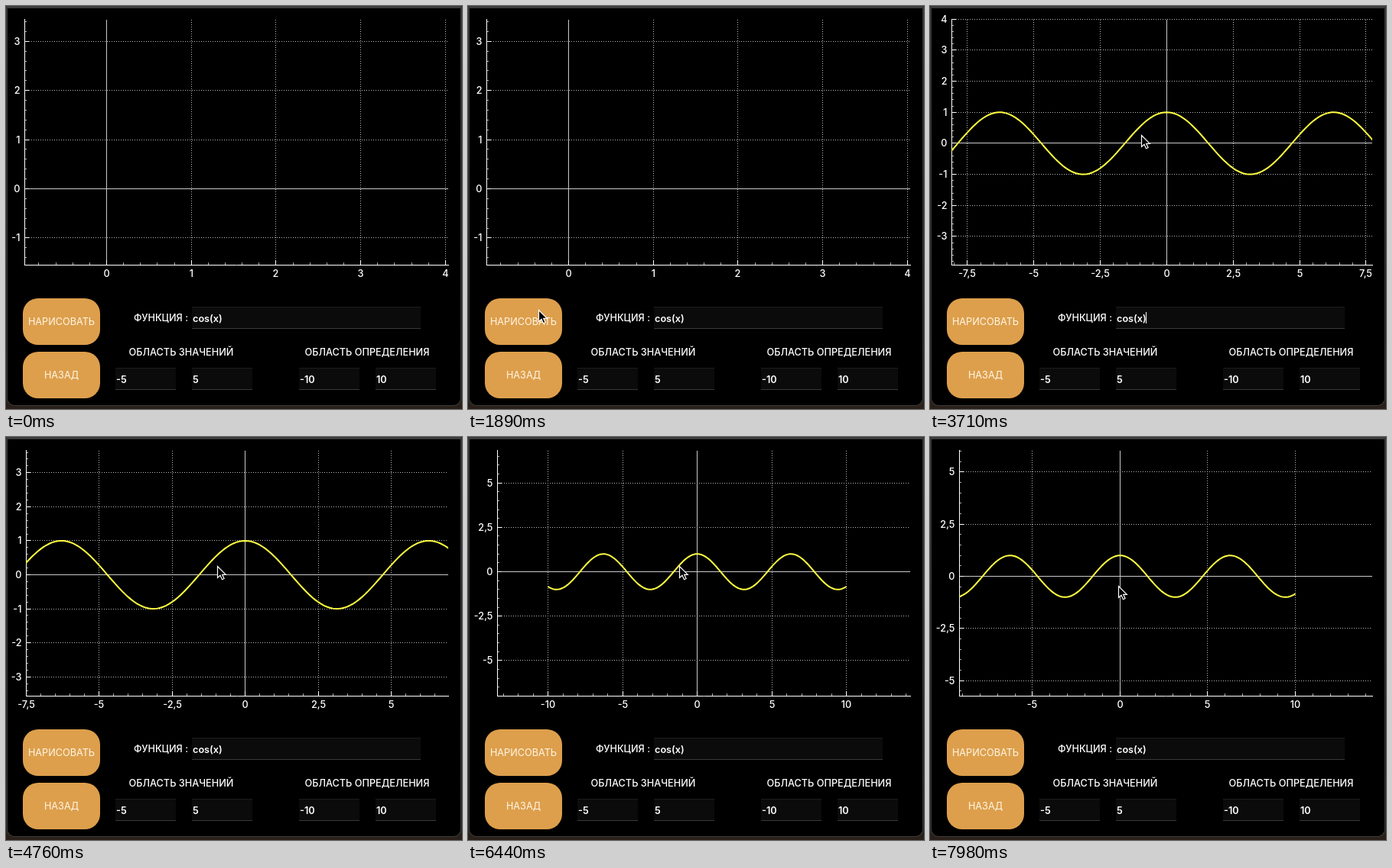
These frames come from a looping animation (596x528 px, 8 s). An HTML page with a canvas:

```html
<!DOCTYPE html>
<html lang="ru">
<head>
<meta charset="utf-8">
<style>
  html, body { margin: 0; width: 596px; height: 528px; overflow: hidden; background: #000; }
  canvas { display: block; }
</style>
</head>
<body>
<canvas id="stage" width="596" height="528"></canvas>
<script>
const ctx = document.getElementById('stage').getContext('2d');
const LOOP = 8000, STEP = 70, DRAWN = 2030;
const TOP = 17, BOTTOM = 339, RIGHT = 578;
const FONT = '12.7px Inter, "Noto Sans", sans-serif';

// time, pixels per unit of x
const zoom = [
  [3430, 27.5], [3990, 42], [4690, 42], [4760, 38.2], [5110, 32],
  [5250, 32], [5390, 28.5], [5460, 28.5], [5600, 25.1], [5670, 25.1],
  [5810, 22.1], [6020, 22.1], [6230, 18.6], [6300, 18.6], [6440, 19.5],
  [6580, 22.9]
];

// time, shift of the plot by dragging
const pan = [
  [3430, -1.6, .3], [3990, 0, 0], [6790, 0, 0], [7350, -46.4, 2.3],
  [7490, -49.4, 4.3], [7560, -49.4, 4.3], [7700, -51.4, 5],
  [7840, -51.4, 5], [7980, -53.4, 5.3]
];

// time, x, y of the pointer tip
const pointer = [
  [560, 487, 488], [910, 300, 430], [1190, 120, 385], [1330, 92, 398],
  [2660, 92, 398], [2940, 168, 300], [3430, 276, 169], [6650, 276, 169],
  [6790, 300, 188], [7350, 252, 192], [7560, 250, 193], [7840, 248, 195],
  [7980, 246, 195]
];

const caretTimes = [[2520, 3010], [3500, 3990], [5530, 5950]];

// smallest scale, label step, tick step
const xSteps = [[90, 1, .2], [34, 2.5, .5], [0, 5, 1]];
const ySteps = [[40, 1, .2], [30, 2, .5], [0, 2.5, .5]];

function at(keys, t) {
  const next = keys.findIndex(k => k[0] > t);
  if (next < 0) return keys[keys.length - 1].slice(1);
  if (next === 0) return keys[0].slice(1);
  const a = keys[next - 1], b = keys[next];
  const p = (t - a[0]) / (b[0] - a[0]);
  return a.slice(1).map((v, i) => v + (b[i + 1] - v) * p);
}

function viewAt(t) {
  if (t < DRAWN) return { x0: 131, sx: 110.7, y0: 239, sy: 64.4, left: 24 };
  const [sx] = at(zoom, t), [dx, dy] = at(pan, t);
  const k = (sx - 19.5) / 18.7;
  const left = sx > 36 ? 26 : sx > 26 ? 28 : 38;
  return { x0: 299 + 13 * k + dx, sx, y0: 176 + 4 * k + dy, sy: sx * 644 / (RIGHT - left), left };
}

const crisp = v => Math.round(v) + .5;

function line(x1, y1, x2, y2, color, dash = []) {
  ctx.strokeStyle = color;
  ctx.lineWidth = 1;
  ctx.setLineDash(dash);
  ctx.beginPath();
  ctx.moveTo(x1, y1);
  ctx.lineTo(x2, y2);
  ctx.stroke();
  ctx.setLineDash([]);
}

function text(s, x, y, align = 'left', weight = 500, color = '#fff') {
  ctx.font = weight + ' ' + FONT;
  ctx.textAlign = align;
  ctx.fillStyle = color;
  ctx.fillText(s, x, y);
}

function box(x, y, w, h, r, color) {
  ctx.fillStyle = color;
  ctx.beginPath();
  ctx.roundRect(x, y, w, h, r);
  ctx.fill();
}

function drawWindow() {
  const wall = ctx.createLinearGradient(0, 0, 0, 528);
  wall.addColorStop(0, '#303234');
  wall.addColorStop(.75, '#1c1c1c');
  wall.addColorStop(1, '#2a2019');
  ctx.fillStyle = wall;
  ctx.fillRect(0, 0, 596, 528);
  box(1, -10, 594, 534, 10, '#3c3c3c');
  box(2, 3, 592, 520, [0, 0, 9, 9], '#000');
}

function button(label, y) {
  box(22, y, 101, 61, 20, '#dd9f4c');
  text(label, 72.5, y + 35, 'center', 400, '#fff6e6');
}

function field(value, x, y, w) {
  box(x, y, w, 29, 0, '#0b0b0b');
  line(x, y + .5, x + w, y + .5, '#1c1c1c');
  line(x, y + 28.5, x + w, y + 28.5, '#393939');
  text(value, x + 1, y + 19.5, 'left', 600);
}

function drawForm(t) {
  button('НАРИСОВАТЬ', 383);
  button('НАЗАД', 453);
  text('ФУНКЦИЯ :', 238, 413, 'right');
  text('ОБЛАСТЬ ЗНАЧЕНИЙ', 229, 458, 'center');
  text('ОБЛАСТЬ ОПРЕДЕЛЕНИЯ', 472, 458, 'center');
  field('cos(x)', 243, 394, 299);
  field('-5', 143, 474, 79);
  field('5', 243, 474, 79);
  field('-10', 383, 474, 79);
  field('10', 483, 474, 79);
  if (caretTimes.some(([on, off]) => t >= on && t < off)) line(282.5, 401, 282.5, 416, '#fff');
}

function ticks(step, low, high, draw) {
  for (let i = Math.ceil(low / step - .02); i <= high / step + .02; i++) draw(i * step);
}

const format = v => String(+v.toFixed(1)).replace('.', ',');

function drawPlot({ x0, sx, y0, sy, left }) {
  const px = v => crisp(x0 + v * sx), py = v => crisp(y0 - v * sy);
  const [, xMajor, xMinor] = xSteps.find(s => sx > s[0]);
  const [, yMajor, yMinor] = ySteps.find(s => sy > s[0]);
  const xRange = [(left - x0) / sx, (RIGHT - x0) / sx];
  const yRange = [(y0 - BOTTOM) / sy, (y0 - TOP) / sy];
  const gridStyle = v => v ? ['#b8b8b8', [1, 2]] : ['#cacaca'];

  ticks(xMinor, ...xRange, v => line(px(v), BOTTOM - 3, px(v), BOTTOM, '#b0b0b0'));
  ticks(yMinor, ...yRange, v => line(left, py(v), left + 3, py(v), '#b0b0b0'));
  ticks(xMajor, ...xRange, v => {
    line(px(v), TOP + 1, px(v), BOTTOM, ...gridStyle(v));
    line(px(v), BOTTOM - 6, px(v), BOTTOM, '#fff');
    text(format(v), px(v), 355, 'center');
  });
  ticks(yMajor, ...yRange, v => {
    line(left, py(v), RIGHT, py(v), ...gridStyle(v));
    line(left, py(v), left + 6, py(v), '#fff');
    text(format(v), left - 5.5, py(v) + 4.5, 'right');
  });
  line(left + .5, TOP, left + .5, BOTTOM + 1, '#fff');
  line(left, BOTTOM + .5, RIGHT + 1, BOTTOM + .5, '#fff');
}

function drawCurve({ x0, sx, y0, sy, left }) {
  ctx.save();
  ctx.beginPath();
  ctx.rect(left, TOP, RIGHT - left, BOTTOM - TOP);
  ctx.clip();
  ctx.beginPath();
  for (let x = -10; x <= 10.001; x += .1) {
    ctx.lineTo(x0 + .5 + x * sx, y0 + .5 - Math.cos(x) * sy);
  }
  ctx.strokeStyle = '#ffff42';
  ctx.lineWidth = 2;
  ctx.stroke();
  ctx.restore();
}

function drawPointer([x, y]) {
  ctx.save();
  ctx.translate(Math.round(x) + .5, Math.round(y) + .5);
  const arrow = new Path2D('M0 0V15L3.5 11.8L6 17.2L8.6 16L6.2 10.8H10.8Z');
  ctx.fillStyle = '#000';
  ctx.strokeStyle = '#fff';
  ctx.lineWidth = 1.2;
  ctx.fill(arrow);
  ctx.stroke(arrow);
  ctx.restore();
}

function frame(now) {
  const t = Math.floor(now % LOOP / STEP) * STEP;
  const view = viewAt(t);
  drawWindow();
  drawPlot(view);
  if (t >= DRAWN) drawCurve(view);
  drawForm(t);
  if (t >= 560) drawPointer(at(pointer, t));
  requestAnimationFrame(frame);
}
frame(performance.now());
</script>
</body>
</html>
```
